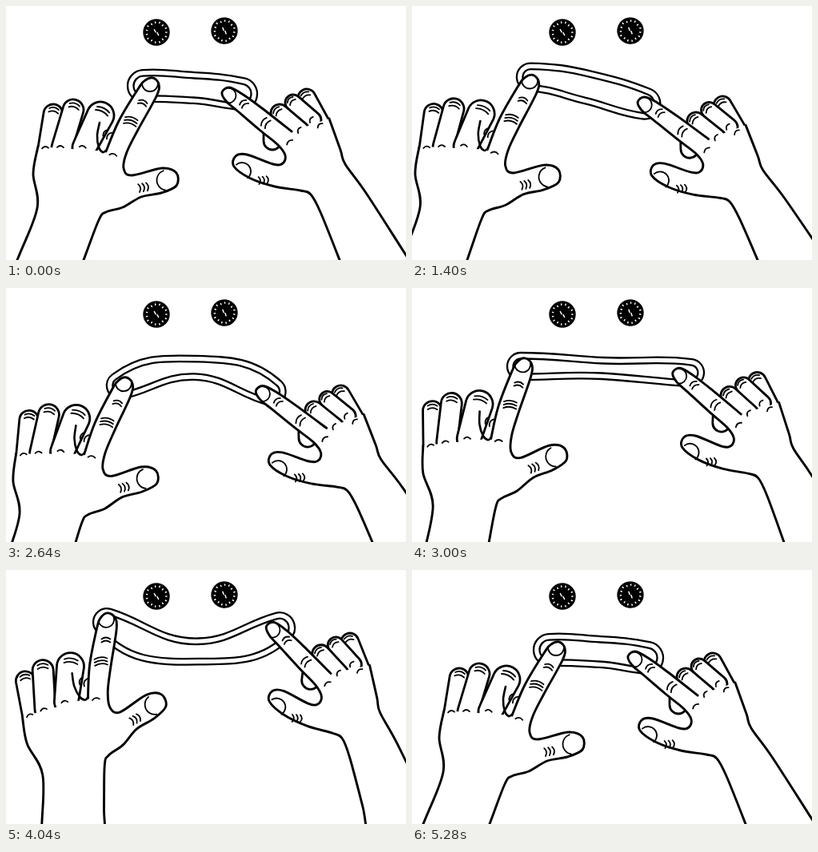
Recreate the animation shown at these times as an HTML page with a canvas. Size 500 by 318 pixels, loop 5.4 s.

```html
<!DOCTYPE html>
<html lang="en">
<head>
<meta charset="utf-8">
<title>Pulling faces</title>
<style>
  html, body { margin: 0; width: 100%; height: 100%; overflow: hidden; background: #fff; }
  canvas { display: block; width: 500px; height: 318px; }
</style>
</head>
<body>
<canvas id="stage"></canvas>
<script>
const W = 500, H = 318, LOOP = 5400, STEP = 40, MOVE = 720, LIP = 7.5;
const RAD = Math.PI / 180;
const canvas = document.getElementById('stage');
const ctx = canvas.getContext('2d');
const dpr = window.devicePixelRatio || 1;
canvas.width = W * dpr;
canvas.height = H * dpr;

// body: open outline of pointing finger, thumb and arm
// fingers: tip x, y, r and base x, y, r
// nails: x, y, r, first and last angle
// creases: x, y, angle, length, count, gap
const leftHand = {
  pivot: [183, 90],
  body: [[125, 182], [141, 144], [165, 104], [174, 93], [184, 90], [191, 98], [188, 113], [165, 155],
    [151, 183], [147, 203], [157, 212], [195, 203], [213, 209], [213, 225], [194, 234], [169, 239],
    [146, 252], [125, 258], [116, 268], [97, 318], [55, 430], [-32, 430], [14, 318], [39, 253], [34, 210], [40, 176]],
  fingers: [[59, 135, 12, 51, 178, 11], [84, 130, 13, 70, 177, 13], [118, 137, 17, 98, 177, 15]],
  fold: [[117, 146], [114, 162], [116, 177], [121, 183], [125, 181]],
  nails: [[180, 97, 10, 0, 185], [201, 218, 12.5, 100, 250]],
  creases: [[156, 144, 15, 16, 3, 4], [171, 121, 20, 11, 2, 4], [172, 227, 80, 10, 3, 5],
    [134, 186, 10, 9, 1, 0], [126, 160, -50, 10, 2, 6]]
};

const rightHand = {
  pivot: [270, 104],
  body: [[357, 157], [320, 128], [295, 110], [279, 102], [270, 108], [275, 119], [290, 132], [318, 156],
    [340, 174], [349, 187], [346, 197], [334, 198], [301, 186], [287, 188], [285, 201], [306, 216],
    [336, 226], [368, 231], [381, 236], [393, 258], [417, 318], [460, 430], [575, 430], [500, 312],
    [450, 234], [424, 198], [418, 180], [404, 141]],
  lobe: [333, 169, 11, 333, 162, 11],
  fingers: [[376, 115, 11, 394, 150, 12], [359, 121, 10, 383, 143, 11], [342, 134, 11, 368, 156, 11]],
  nails: [[278, 112, 9.5, -90, 100], [295, 207, 11, -130, 50]],
  creases: [[324, 146, -55, 12, 2, 6], [297, 122, -35, 10, 2, 5], [322, 218, 85, 9, 3, 5], [354, 170, -40, 9, 1, 0]]
};

// Hands: fingertip x, y, angle. Mouth spine (left, middle, right): x, y, angle, half width.
const poses = [
  { left: [183, 90, 0], right: [270, 104, 0], mouth: [172, 100, -3, 20, 235, 102.5, 3, 19.5, 294, 110, 8, 20] },
  { left: [146, 67, -3.2], right: [278, 103, -0.2], mouth: [147, 67, 22, 17.5, 216, 103, 18, 22, 284, 109, 0, 20] },
  { left: [162, 144, 4.1], right: [294, 155, -6.1], mouth: [152, 154, -56, 17, 233, 99, 0, 17, 311, 161, 58, 18] },
  { left: [140, 88, -9.9], right: [326, 102, 1.9], mouth: [136, 98, 0, 17, 238, 100.5, 3, 13.5, 348, 106, 5, 17] },
  { left: [125.5, 54, -20], right: [326, 66, 7], mouth: [126, 65, 34, 17, 240, 102, -1, 16.5, 342, 72, -30, 19] }
];
const starts = [120, 1200, 2280, 3360, 4560];

function ease(t) {
  const u = Math.pow(Math.min(1, Math.max(0, t)), 0.87);
  return u * u * (3 - 2 * u);
}

const mix = (a, b, p) => a.map((v, i) => v + (b[i] - v) * p);
const polar = (x, y, r, deg) => [x + r * Math.cos(deg * RAD), y + r * Math.sin(deg * RAD)];

function paint(width, filled) {
  if (filled) ctx.fill();
  ctx.lineWidth = width;
  ctx.stroke();
}

// Smooth open curve through the points.
function curve(p) {
  ctx.beginPath();
  ctx.moveTo(...p[0]);
  for (let i = 0; i < p.length - 1; i++) {
    const a = p[Math.max(0, i - 1)], b = p[i], c = p[i + 1], d = p[Math.min(p.length - 1, i + 2)];
    ctx.bezierCurveTo(b[0] + (c[0] - a[0]) / 6, b[1] + (c[1] - a[1]) / 6,
      c[0] - (d[0] - b[0]) / 6, c[1] - (d[1] - b[1]) / 6, c[0], c[1]);
  }
}

function capsule([x1, y1, r1, x2, y2, r2]) {
  const a = Math.atan2(y1 - y2, x1 - x2), q = Math.PI / 2;
  ctx.beginPath();
  ctx.arc(x1, y1, r1, a - q, a + q);
  ctx.arc(x2, y2, r2, a + q, a - q);
  ctx.closePath();
  paint(2.8, true);
}

// Parallel short strokes, each slightly bowed.
function crease([x, y, deg, len, count, gap]) {
  ctx.save();
  ctx.translate(x, y);
  ctx.rotate(deg * RAD);
  ctx.beginPath();
  for (let i = 0; i < count; i++) {
    const o = (i - (count - 1) / 2) * gap;
    ctx.moveTo(-len / 2, o + 1);
    ctx.quadraticCurveTo(0, o - 3, len / 2, o + 1);
  }
  paint(1.8);
  ctx.restore();
}

function edge(from, fromDeg, to, toDeg) {
  const h = 0.4 * Math.hypot(to[0] - from[0], to[1] - from[1]);
  ctx.bezierCurveTo(...polar(...from, h, fromDeg), ...polar(...to, -h, toDeg), ...to);
}

// A band along the spine with round ends; bent ends wrap further on the hollow side.
function band([lx, ly, la, lr, mx, my, ma, mr, rx, ry, ra, rr], inset) {
  const l = lr - inset, m = mr - inset, r = rr - inset;
  const lTop = la - Math.abs(la) / 2, lLow = la + Math.abs(la) / 2;
  const rTop = ra + Math.abs(ra) / 2, rLow = ra - Math.abs(ra) / 2;
  const top = polar(mx, my, m, ma - 90), low = polar(mx, my, m, ma + 90);
  ctx.beginPath();
  ctx.arc(lx, ly, l, (lLow + 90) * RAD, (lTop + 270) * RAD);
  edge(polar(lx, ly, l, lTop - 90), lTop, top, ma);
  edge(top, ma, polar(rx, ry, r, rTop - 90), rTop);
  ctx.arc(rx, ry, r, (rTop - 90) * RAD, (rLow + 90) * RAD);
  edge(polar(rx, ry, r, rLow + 90), rLow + 180, low, ma + 180);
  edge(low, ma + 180, polar(lx, ly, l, lLow + 90), lLow + 180);
  paint(2.3);
}

function drawHand(hand, [x, y, deg]) {
  ctx.save();
  ctx.translate(x, y);
  ctx.rotate(deg * RAD);
  ctx.translate(-hand.pivot[0], -hand.pivot[1]);
  ctx.fillStyle = '#fff';
  if (hand.lobe) capsule(hand.lobe);
  hand.fingers.forEach(capsule);
  curve(hand.body);
  paint(2.9, true);
  if (hand.fold) {
    curve(hand.fold);
    paint(2.6);
  }
  for (const [tx, ty, r, bx, by] of hand.fingers) {
    const across = Math.atan2(ty - by, tx - bx) / RAD + 90;
    crease([...polar(tx, ty, r * 0.4, across - 90), across, r, 2, 4.5]);
    crease([bx - 2, by - 1, across - 15, 8, 1, 0]);
  }
  hand.creases.forEach(crease);
  for (const [nx, ny, r, a, b] of hand.nails) {
    ctx.beginPath();
    ctx.arc(nx, ny, r, a * RAD, b * RAD);
    paint(1.8);
  }
  ctx.restore();
}

function drawEye(x, y, turn) {
  ctx.save();
  ctx.translate(x, y);
  ctx.rotate(turn);
  ctx.fillStyle = '#000';
  ctx.beginPath();
  ctx.arc(0, 0, 16.7, 0, 2 * Math.PI);
  ctx.fill();
  ctx.strokeStyle = '#fff';
  ctx.beginPath();
  for (let i = 0; i < 15; i++) {
    const a = i * 24, r = 11.8 + 0.7 * Math.sin(i * 2.3);
    ctx.moveTo(...polar(0, 0, r, a));
    ctx.lineTo(...polar(0, 0, r + 1.2, a));
  }
  for (const s of [-1, 1]) {
    ctx.moveTo(s, s * 0.3);
    ctx.lineTo(s * 2.6, s * 3.5);
  }
  paint(1.5);
  ctx.restore();
}

function draw(time) {
  const t = Math.floor(time % LOOP / STEP) * STEP;
  const leg = Math.max(0, starts.filter(s => t >= s).length - 1);
  const from = poses[leg], to = poses[(leg + 1) % poses.length];
  const p = ease((t - starts[leg]) / MOVE);

  ctx.setTransform(dpr, 0, 0, dpr, 0, 0);
  ctx.fillStyle = '#fff';
  ctx.fillRect(0, 0, W, H);
  ctx.strokeStyle = '#000';
  ctx.lineCap = ctx.lineJoin = 'round';

  drawEye(188, 33, 0);
  drawEye(273, 31, 0.15);
  const mouth = mix(from.mouth, to.mouth, p);
  band(mouth, 0);
  band(mouth, LIP);
  drawHand(leftHand, mix(from.left, to.left, p));
  drawHand(rightHand, mix(from.right, to.right, p));
}

const begin = performance.now();
function tick() {
  draw(performance.now() - begin);
  requestAnimationFrame(tick);
}
tick();
</script>
</body>
</html>
```
